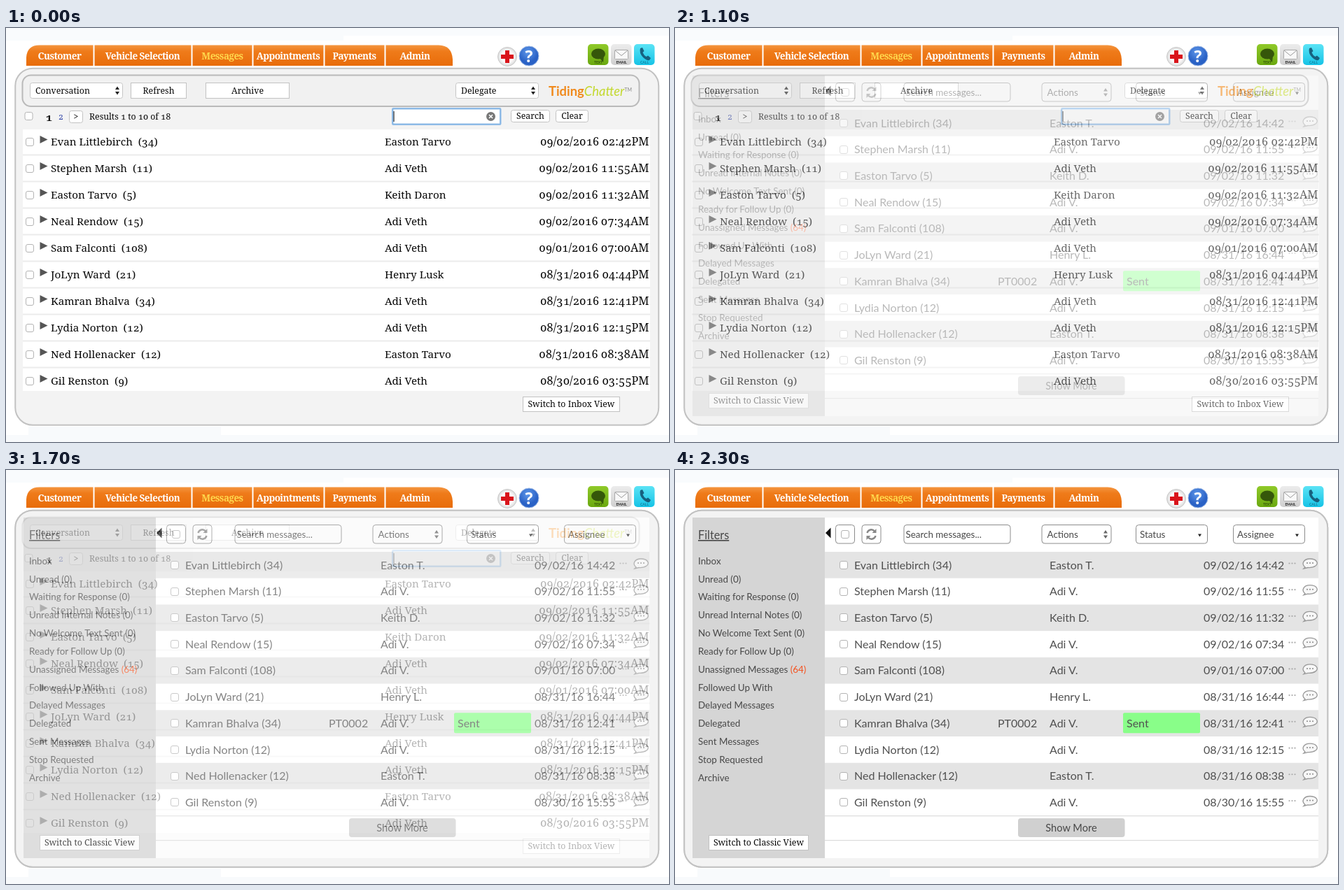
Animation of 947x592 px, one loop 5000 ms. Source, as an HTML page:

```html
<!DOCTYPE html>
<html lang="en">
<head>
<meta charset="utf-8">
<title>Messages: classic view to inbox view</title>
<style>
  html, body { margin: 0; width: 100%; height: 100%; overflow: hidden; background: #fff; }
  svg { display: block; }
  text { white-space: pre; }
  .serif { font: 500 12.3px "Noto Serif", serif; font-variant-numeric: oldstyle-nums; fill: #080808; }
  .row { font-size: 15.2px; }
  .date { font-size: 16.2px; }
  .tab { font: bold 13.5px "Noto Serif", serif; letter-spacing: -.55px; fill: #fff; }
  .lato { font: 13.4px Lato, sans-serif; fill: #484848; }
  .item { font-size: 16px; fill: #505050; }
  .brand { font: 18.4px Lato, sans-serif; }
  .help { font: bold 23px "Noto Sans", sans-serif; fill: #fff; }
  .tiny { font: bold 5px Lato, sans-serif; }
  .mid { text-anchor: middle; }
  .end { text-anchor: end; }
</style>
</head>
<body>
<svg id="stage" width="947" height="592" viewBox="0 0 947 592" xmlns="http://www.w3.org/2000/svg">
  <defs>
    <linearGradient id="orange" x2="0" y2="1">
      <stop offset="0" stop-color="#f4953f"/><stop offset=".3" stop-color="#ef7b1a"/><stop offset="1" stop-color="#e86c0a"/>
    </linearGradient>
    <linearGradient id="green" x2="0" y2="1"><stop stop-color="#8fc929"/><stop offset="1" stop-color="#6aa80f"/></linearGradient>
    <linearGradient id="silver" x2="0" y2="1"><stop stop-color="#ececec"/><stop offset="1" stop-color="#cfcfcf"/></linearGradient>
    <linearGradient id="cyan" x2="0" y2="1"><stop stop-color="#5be3f5"/><stop offset="1" stop-color="#16c3e6"/></linearGradient>
    <radialGradient id="blue" cx=".45" cy=".3"><stop stop-color="#5f98ea"/><stop offset="1" stop-color="#2a62c6"/></radialGradient>
    <radialGradient id="pearl"><stop offset=".6" stop-color="#fff"/><stop offset="1" stop-color="#d9d9d9"/></radialGradient>
  </defs>
  <g id="header"></g>
  <g id="classic"></g>
  <g id="inbox"></g>
</svg>
<script>
const rect = (x, y, w, h, r, fill, stroke = 'none', sw = 1) =>
  `<rect x="${x}" y="${y}" width="${w}" height="${h}" rx="${r}" fill="${fill}" stroke="${stroke}" stroke-width="${sw}"/>`;
const path = (d, fill, stroke = 'none', sw = 1) =>
  `<path d="${d}" fill="${fill}" stroke="${stroke}" stroke-width="${sw}"/>`;
const text = (x, y, s, cls, style = '') => `<text x="${x}" y="${y}" class="${cls}" style="${style}">${s}</text>`;
const circle = (x, y, r, fill, stroke = 'none') => `<circle cx="${x}" cy="${y}" r="${r}" fill="${fill}" stroke="${stroke}"/>`;
const list = (items, draw) => items.map(draw).join('');

const checkbox = (x, y, size) => rect(x + .5, y + .5, size - 1, size - 1, 2.5, '#fff', '#b4b4b4');
const spinner = (x, y, c) => path(`M${x - 3} ${y - 1.5}l3 -4.5l3 4.5zM${x - 3} ${y + 1.5}l3 4.5l3 -4.5z`, c);
const button = (x, y, w, h, label, r = 0) =>
  rect(x + .5, y + .5, w - 1, h - 1, r, '#fff', '#c2c2c2') + text(x + w / 2, y + h / 2 + 4.2, label, 'serif mid');
const select = (x, w, label) =>
  rect(x + .5, 78.5, w - 1, 22, 3, '#fff', '#c6c6c6') + text(x + 8, 94, label, 'serif') + spinner(x + w - 8, 89.5, '#222');
const field = (x, w, label = '', pad = 8) =>
  rect(x + .5, 78.5, w - 1, 26.5, 4, '#fff', '#8c8c8c') + text(x + pad, 97, label, 'lato');
const panel = rect(13.25, 57.75, 919, 510, 25, '#f3f3f3', '#c2c2c2', 2);

// name, message count, agent, date, hour, minute
const messages = [
  ['Evan Littlebirch', 34, 'Easton Tarvo', '09/02', 14, '42'],
  ['Stephen Marsh', 11, 'Adi Veth', '09/02', 11, '55'],
  ['Easton Tarvo', 5, 'Keith Daron', '09/02', 11, '32'],
  ['Neal Rendow', 15, 'Adi Veth', '09/02', 7, '34'],
  ['Sam Falconti', 108, 'Adi Veth', '09/01', 7, '00'],
  ['JoLyn Ward', 21, 'Henry Lusk', '08/31', 16, '44'],
  ['Kamran Bhalva', 34, 'Adi Veth', '08/31', 12, '41'],
  ['Lydia Norton', 12, 'Adi Veth', '08/31', 12, '15'],
  ['Ned Hollenacker', 12, 'Easton Tarvo', '08/31', 8, '38'],
  ['Gil Renston', 9, 'Adi Veth', '08/30', 15, '55']
];
const two = n => String(n).padStart(2, '0');
const clock12 = (h, m) => `${two(h % 12 || 12)}:${m}${h < 12 ? 'AM' : 'PM'}`;
const initialOnly = name => name.replace(/ (.).*/, ' $1.');

function drawHeader() {
  const tabs = [['Customer', 76.5], ['Vehicle Selection', 195], ['Messages', 309],
                ['Appointments', 403], ['Payments', 497.5], ['Admin', 584]];
  return path('M0 0H947V11H482V18H0z', '#f9fbfd') +
    path('M0 582H32V570H307V582H947V592H0z', '#f8fafc') +
    path('M29 54V42Q30 24.500 48 24.500H618Q637 25 638 45V54z', 'url(#orange)') +
    list([125.5, 265.5, 352.5, 454.5, 541.5], x => rect(x - 1, 24, 2, 30, 0, '#fff')) +
    list(tabs, ([s, x]) => text(x, 45, s, 'tab mid', s === 'Messages' ? 'fill:#ffd84d' : '')) +
    circle(716, 41, 13.5, 'url(#pearl)', '#c9c9c9') +
    path('M713 32h6v6h6v6h-6v6h-6v-6h-6v-6h6z', '#d9141b') +
    circle(747, 40, 14, 'url(#blue)', '#9db8e4') +
    text(747, 48.5, '?', 'help mid') +
    rect(831, 23, 29.5, 30, 5, 'url(#green)') +
    '<ellipse cx="846" cy="37" rx="10" ry="7.5" fill="#35570a"/>' + path('M848 43l5 6l1 -9z', '#35570a') +
    text(846, 50.5, 'TEXT', 'tiny mid', 'fill:#35570a') +
    rect(864, 23, 29.5, 30, 5, 'url(#silver)') +
    rect(869.5, 31.5, 19, 13, 1, '#f8f8f8', '#aaa') + path('M870 32l9 7.5l9 -7.5', 'none', '#999') +
    text(879, 50.5, 'EMAIL', 'tiny mid', 'fill:#222') +
    rect(897, 23, 29.5, 30, 5, 'url(#cyan)') +
    path('M906 29l3 -1l2.5 5l-2 2q1.500 4 5 6l2.500 -1.500l4 3.500l-2 3q-4 1 -9 -4q-6 -6 -4 -13z', '#17617f') +
    text(912, 50.5, 'CALL', 'tiny mid', 'fill:#147f9c');
}

function drawClassic() {
  const rows = list(messages, ([name, count, agent, day, h, m], i) => {
    const y = 162 + 38 * i;
    return checkbox(28, y - 5, 12) +
      path(`M48.500 ${y - 8}l11 5.500l-11 5.500z`, '#555') +
      text(64, y + 5.5, `${name}  (${count})`, 'serif row') +
      text(541, y + 5.5, agent, 'serif row') +
      text(918.5, y + 5.5, `${day}/2016 ${clock12(h, m)}`, 'serif date end') +
      (i < 9 ? rect(24, y + 18.5, 896, 2, 0, '#ececec') : '');
  });
  return panel +
    rect(23.5, 67.5, 881, 44.5, 12, '#f1f1f1', '#bababa', 2) +
    select(34, 133, 'Conversation') + button(178, 78, 80, 23, 'Refresh') +
    button(285, 78, 120, 23, 'Archive') + select(642, 119, 'Delegate') +
    text(775, 97, '<tspan font-weight="700" fill="#f08a1d">Tiding</tspan>' +
      '<tspan font-style="italic" fill="#c3d82e">Chatter</tspan>' +
      '<tspan font-size="7" dy="-6" fill="#888">TM</tspan>', 'brand') +
    checkbox(26.5, 120, 12) +
    text(57, 132.5, '1', 'serif', 'font-size:15px;font-weight:700') +
    text(75, 131, '2', 'serif', 'font-size:12px;fill:#3447a8') +
    button(90, 118, 20, 18, '&gt;', 3) +
    text(119, 131, 'Results 1 to 10 of 18', 'serif') +
    rect(552.25, 115.25, 154, 22.5, 1, '#fff', '#8dbae6', 2.5) +
    rect(553.5, 119, 1, 15, 0, '#000') +
    circle(692.5, 126.5, 6.5, '#777') + path('M690 124l5 5m0 -5l-5 5', 'none', '#fff', 1.6) +
    button(721, 117, 56, 18, 'Search', 3) + button(785, 117, 47, 18, 'Clear', 3) +
    rect(24, 145, 896, 374, 0, '#fff') + rows +
    button(738, 527, 139, 22, 'Switch to Inbox View');
}

function drawInbox() {
  const filters = ['Inbox', 'Unread (0)', 'Waiting for Response (0)', 'Unread Internal Notes (0)',
    'No Welcome Text Sent (0)', 'Ready for Follow Up (0)',
    'Unassigned Messages <tspan fill="#f4511e">(64)</tspan>', 'Followed Up With', 'Delayed Messages',
    'Delegated', 'Sent Messages', 'Stop Requested', 'Archive'];
  const bubble = y => path(`M900 ${y + 3}C894 ${y - 2} 898 ${y - 9} 907 ${y - 9}S920 ${y - 3} 915 ${y + 1}` +
      `Q911 ${y + 4} 904 ${y + 3.5}L898 ${y + 5}z`, '#f7f7f7', '#999', 1.3) +
    list([903, 907, 911], x => circle(x, y - 3, 1, '#888'));
  const rows = list(messages, ([name, count, agent, day, h, m], i) => {
    const top = 117 + 37.72 * i, y = top + 19;
    return (i % 2 ? '' : rect(214, top, 705, 37.7, 0, '#e4e4e4')) +
      checkbox(235, Math.round(y - 6), 12) +
      text(256, y + 5.5, `${name} (${count})`, 'lato item') +
      (i === 6 ? text(461, y + 5.5, 'PT0002', 'lato item') + rect(640, y - 15, 110, 29, 2, '#89fe89') +
        text(645, y + 5.5, 'Sent', 'lato item') : '') +
      text(535, y + 5.5, initialOnly(agent), 'lato item') +
      text(755, y + 5.5, `${day}/16 ${two(h)}:${m}`, 'lato item') +
      list([877.5, 881.5, 885.5], x => circle(x, y - 2.5, 1.1, '#aaa')) + bubble(y);
  });
  const dropArrow = x => path(`M${x - 2.5} 91.500h5l-2.500 4z`, '#222');
  return panel +
    rect(25, 68, 894, 487, 0, '#fff') + rect(25, 68, 189, 487, 0, '#d5d5d5') +
    text(33, 99, 'Filters', 'lato', 'font-size:16.3px;text-decoration:underline') +
    list(filters, (s, i) => text(33, 134.7 + 25.83 * i, s, 'lato')) +
    button(48, 522, 143, 22, 'Switch to Classic View') +
    path('M222.500 82.500v15l-7.500 -7.500z', '#111') +
    field(229, 28) + checkbox(237, 86, 12) +
    field(266.5, 28) +
    path('M274.500 90a6 6 0 0 1 10.500 -2.500M286.500 94a6 6 0 0 1 -10.500 2.500', 'none', '#888', 2.4) +
    path('M287.500 84v6h-6zM273.500 100v-6h6z', '#888') +
    field(326.5, 153, 'Search messages...', 3) +
    field(523.5, 100, 'Actions') + spinner(615, 92, '#666') +
    field(658, 103, 'Status', 6) + dropArrow(749.5) +
    field(797, 103, 'Assignee', 6) + dropArrow(888.5) +
    rows +
    rect(214, 494, 705, 1.2, 0, '#dcdcdc') + rect(214, 529, 705, 1.2, 0, '#dcdcdc') +
    rect(490, 498, 152.5, 27, 4, '#d0d0d0') +
    text(566, 517, 'Show More', 'lato mid', 'font-size:14.6px');
}

const part = id => document.getElementById(id);
part('header').innerHTML = drawHeader();
part('classic').innerHTML = drawClassic();
part('inbox').innerHTML = drawInbox();

// Hold the classic view, dissolve in hard steps from 20% to 100%, then hold the inbox.
const LOOP = 5000, START = 700, STEP = 200;
const frames = [{ opacity: 0, offset: 0, easing: 'step-end' }];
for (let tenths = 2; tenths <= 10; tenths++) {
  frames.push({ opacity: tenths / 10, offset: (START + STEP * (tenths - 2)) / LOOP, easing: 'step-end' });
}
frames.push({ opacity: 1, offset: 1 });
part('inbox').animate(frames, { duration: LOOP, iterations: Infinity });
</script>
</body>
</html>
```
